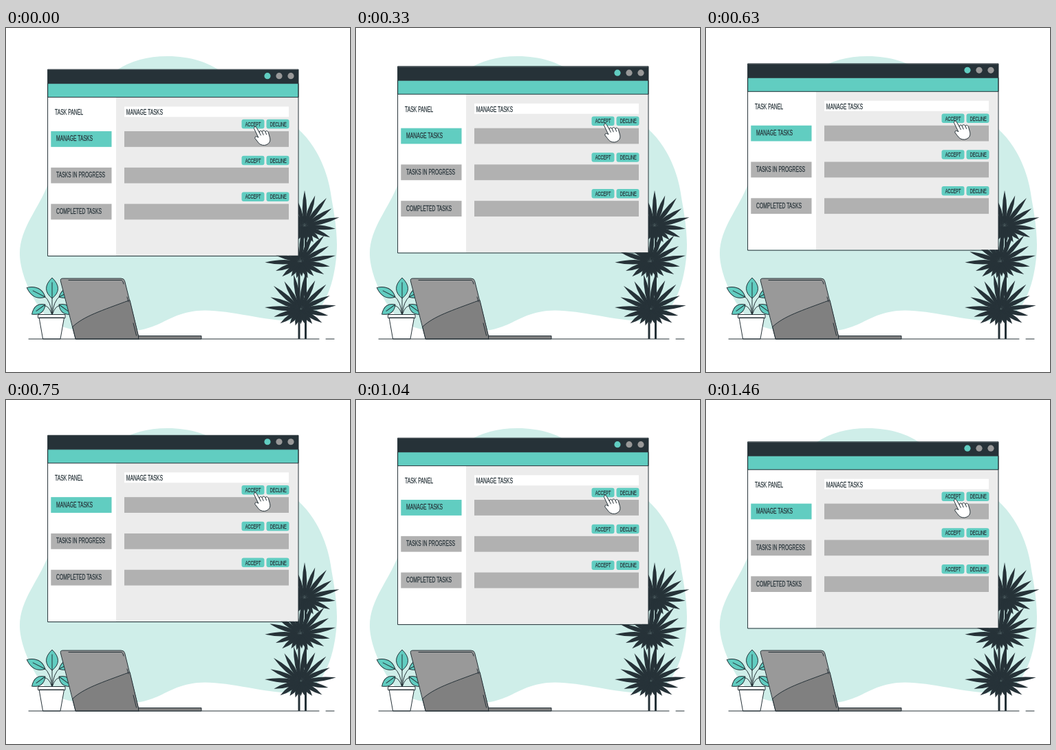
An HTML page for the animation above (1.5 s loop, 500 by 500 pixels).

```html
<!DOCTYPE html>
<html lang="en">
<head>
<meta charset="utf-8">
<title>Task panel</title>
<style>
  html, body { margin: 0; width: 100%; height: 100%; overflow: hidden; background: #fff; }
  svg { display: block; width: 100vw; height: 100vh; }
  text { font: 11px "Liberation Sans", Arial, sans-serif; fill: #263238; stroke: #263238; stroke-width: .25; }
  .small { font-size: 9px; }
  .dark { fill: #263238; }
  .teal { fill: #61cdc1; }
  .gray { fill: #b1b1b1; }
  .mid { fill: #999; }
  .deep { fill: #808080; }
  .white { fill: #fff; }
  .line { stroke: #263238; stroke-linejoin: round; stroke-linecap: round; }
  .open { fill: none; }
</style>
</head>
<body>
<svg viewBox="0 0 500 500">
  <path fill="#cfeee9" d="M235 41C268 41 294 50 314 64S390 115 425 147S470 225 472 240S481 285 481 315S472 405 440 421S325 406 278 411S225 441 170 441S100 441 76 432S20 365 20 328S48 262 61 227S110 110 160 62Q190 41 235 41Z"/>
  <g id="palm" class="dark"><path d="M424.5 345h3v107h-3zM434 290h3v162h-3z"/></g>

  <g id="panel">
    <path class="white" d="M61 101h99v230H61z"/>
    <path fill="#ececec" d="M160 101h265v230H160z"/>
    <path class="dark" d="M61 61h364v20H61z"/>
    <path class="teal line" d="M61 81h364v20H61z"/>
    <path class="line open" d="M61 60.6h364v271.2H61z"/>
    <path class="white" d="M172 114.500h239v15H172z"/>
    <g id="content"></g>
    <path class="white line" d="M360.6 146.5C360 143.6 363 143.2 364.2 145.2L368.3 152.3C368 149.5 371 149 372.2 151.2C372.6 148.6 376 149 377 151.2C378 149 380.7 150 381.4 152.2L383.6 160C385 166 381.5 170 375.5 170.8Q369 171 365.5 165.3L361.8 160.6Q362 156 366.6 159.3ZM368.3 152.3l2 4M372.2 151.2l2 4.5M377 151.2l1.6 4"/>
  </g>

  <g id="plant" class="line teal"><path class="open" d="M67 417V388"/></g>
  <g class="line">
    <path class="white" d="M48.5 421H84.500L79 452H54ZM47 416.500h39v5H47z"/>
    <path class="mid" d="M79.300 367.500Q78.500 364 82.500 364H167Q171.500 364 172.500 367.500L193.500 452H101.500Z"/>
    <path class="deep" d="M97 434C113 419 138 411 180 395.500L193.500 452H101.500Z"/>
    <path class="open" d="M91 366.500H168Q170 367 171 372M176 391l2 7M185 429l4.500 18M33 452H455M465 452h12"/>
    <path class="deep" d="M193 447.500h91v4.500H193z"/>
  </g>
</svg>
<script>
  const PERIOD = 1500, RISE = 10, FPS = 24;
  const panel = document.getElementById('panel');
  const add = (id, markup) => document.getElementById(id).insertAdjacentHTML('beforeend', markup);

  // Lettering uses one condensed proportion throughout.
  const label = (x, y, words, style = '') =>
    `<text class="${style}" transform="translate(${x} ${y}) scale(.62 1)">${words}</text>`;
  const box = (x, y, w, h, style, rx = 0) =>
    `<rect x="${x}" y="${y}" width="${w}" height="${h}" rx="${rx}" class="${style}"/>`;
  const button = (x, y, words) =>
    box(x, y, 33, 13.5, 'teal', 3) + label(x + 5.2, y + 10, words, 'small');

  let content = label(71, 126.5, 'TASK PANEL') + label(174.8, 126.5, 'MANAGE TASKS');
  ['MANAGE TASKS', 'TASKS IN PROGRESS', 'COMPLETED TASKS'].forEach((name, i) => {
    const y = 150.4 + i * 52.8;
    content += `<circle class="${i ? 'mid' : 'teal'}" cx="${380 + 17 * i}" cy="70" r="4.6"/>`
      + box(65.3, y, 88.2, 22.8, i ? 'gray' : 'teal') + label(73, y + 14.4, name)
      + box(172, y, 239, 22.8, 'gray')
      + button(342.5, y - 17.2, 'ACCEPT') + button(378.5, y - 17.2, 'DECLINE');
  });
  add('content', content);

  // A pointed leaf growing from (x, y) at an angle in degrees.
  const leaf = (x, y, angle, length, width, detail = '') =>
    `<path transform="translate(${x} ${y}) rotate(${angle})"
      d="M0 0Q${length * .45} ${-width} ${length} 0Q${length * .45} ${width} 0 0${detail}"/>`;

  // Palm crowns: full circles of leaves, shorter towards the ground.
  const LEAVES = 19;
  [[434, 288], [428, 340], [428, 409]].forEach(([x, y], crown) => {
    for (let i = 0; i < LEAVES; i++) {
      const angle = -90 + crown * 4 + i * 360 / LEAVES;
      const droop = Math.max(0, Math.sin(angle * Math.PI / 180));
      add('palm', leaf(x, y, angle, (52 - i % 2 * 5) * (1 - .55 * droop), 6.5));
    }
  });

  // Pot plant: one upright leaf and two mirrored pairs on curved stems.
  add('plant', leaf(67, 393, -90, 30, 17, 'H23'));
  for (const side of [-1, 1]) {
    const turn = angle => side > 0 ? angle : 180 - angle;
    add('plant', `<path class="open" d="M67 417Q${67 + side * 2} 397 ${67 + side * 11} 390
      M67 417Q${67 + side * 5} 402 ${67 + side * 12} 404"/>`
      + leaf(67 + side * 10, 391, turn(-27), 30, 13, 'H20')
      + leaf(67 + side * 10, 402, turn(36), 24, 12, 'H16'));
  }

  function draw(now) {
    const step = Math.floor(((now + 4) % PERIOD) * FPS / 1000);
    const phase = (step + 1) * 1000 / FPS / PERIOD % 1;
    const lift = RISE * (1 - Math.abs(1 - 2 * phase));
    panel.setAttribute('transform', `translate(0 ${.2 - lift})`);
    requestAnimationFrame(draw);
  }
  draw(performance.now());
</script>
</body>
</html>
```
